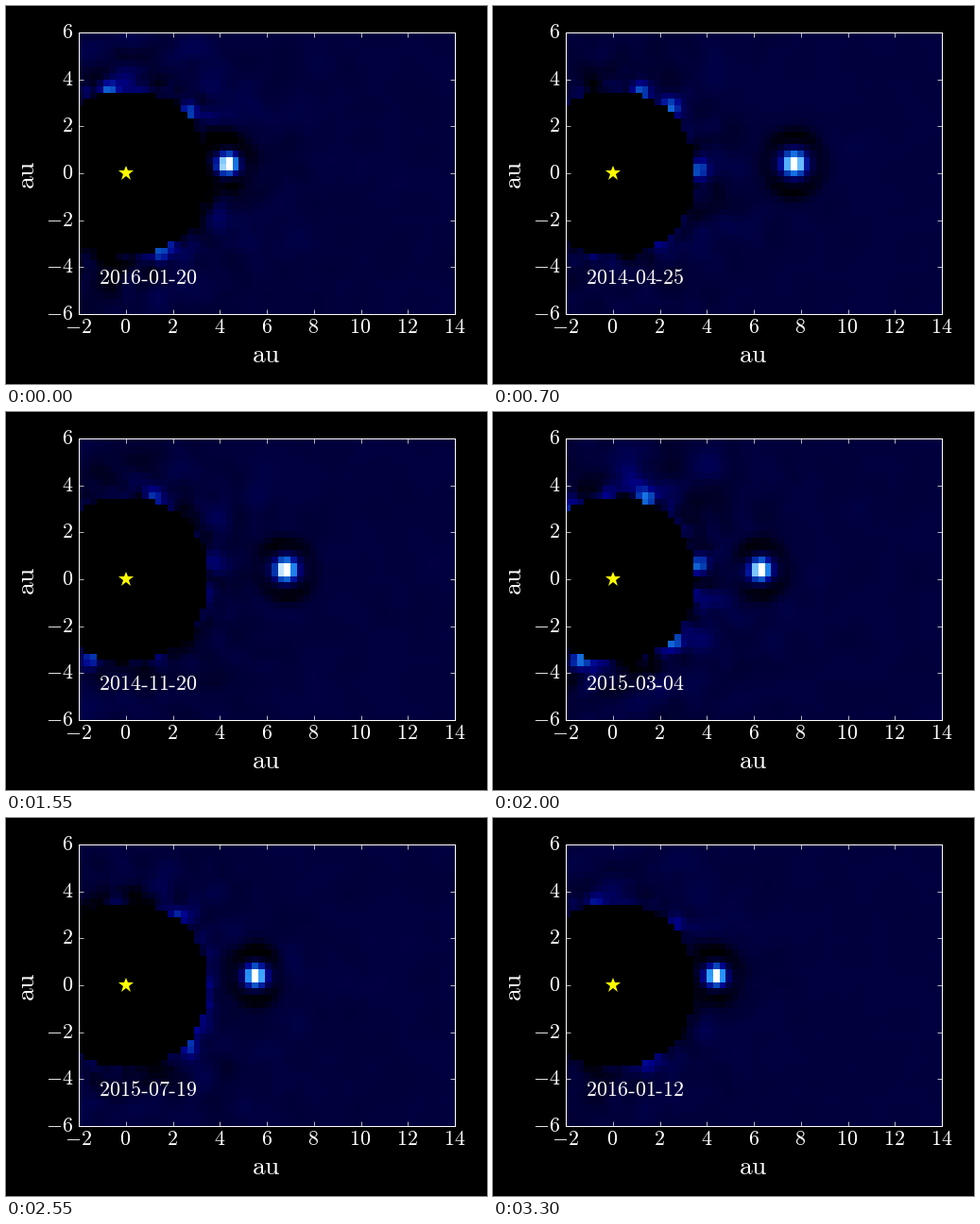
Recreate the animation shown at these times as a matplotlib script. Size 509 px wide and 400 px high, loop 3350 ms.

```python
import numpy as np
import matplotlib.pyplot as plt
from matplotlib.animation import FuncAnimation
from matplotlib.colors import LinearSegmentedColormap

W, H, DPI = 509, 400, 64
LEFT, RIGHT, TOP, BOTTOM = 77, 475, 28, 326
FRAMES, STEP_MS = 67, 50
PT = 72 / DPI          # points per pixel
CELL = 0.2751          # au per detector cell
SKY = 0.125
EDGE = 12.85           # radius of the blocked disc, in cells

plt.rcParams["mathtext.fontset"] = "cm"

cols, rows = np.meshgrid(np.arange(-8, 53), np.arange(-22, 23))
radius = np.hypot(cols, rows)
mask = radius < EDGE
depth = np.clip(radius - EDGE, 0, None)

cmap = LinearSegmentedColormap.from_list("ice", [
    (0.00, "#000000"), (0.28, "#00008c"), (0.42, "#0640b4"),
    (0.56, "#1470e0"), (0.72, "#2c9cff"), (0.86, "#90d0ff"), (1.00, "#ffffff")])


def gauss(d, width):
    return np.exp(-d ** 2 / (2 * width ** 2))


def smooth_noise(rng, width):
    """Unit-variance noise blurred by a Gaussian of the given width."""
    fy = np.fft.fftfreq(cols.shape[0])[:, None]
    fx = np.fft.fftfreq(cols.shape[1])[None, :]
    blur = np.exp(-2 * (np.pi * width) ** 2 * (fx ** 2 + fy ** 2))
    out = np.fft.ifft2(np.fft.fft2(rng.normal(size=cols.shape)) * blur).real
    return (out - out.mean()) / out.std()


def night(seed, strength, *angles):
    """Residual starlight: a noisy halo and bright clumps along the disc edge."""
    rng = np.random.default_rng(seed)
    img = smooth_noise(rng, 1.3) * (.05 * strength * np.exp(-depth / 6) + .003)
    img += .07 * strength * smooth_noise(rng, .7) * np.exp(-depth / 2)
    img -= .015 * np.exp(-depth / 6)
    for a in np.radians(angles):
        d = np.hypot(cols - 13.4 * np.cos(a), rows - 13.4 * np.sin(a))
        img += .42 * strength * gauss(d, 1)
    return img


# Day index -> night; nights in between are blended.
nights = {
    0: night(1, 1.2, 48, 72, 4),
    11: night(2, 1.2, 48, 72, 4),
    32: night(3, .7, 72, 49, -2),
    47: night(4, .7, 71, -113),
    60: night(5, 1.1, 67, -46, 10, -113),
    77: night(6, .7, 52, -45),
    100: night(7, 1.0, 102, 44, -67),
}
nights[99] = .5 * nights[100]
days = np.array(sorted(nights))
stack = np.array([nights[d] for d in days])


def planet(k):
    t = k / 100
    dx = cols - (30.15 - 9 * t - 5.35 * t ** 2)
    dy = rows - 1.5
    r = np.hypot(dx, dy)
    core = 1.12 * gauss(r, 1.15 - .2 * t)
    upright = (dy / np.maximum(r, .1)) ** 2
    ring = gauss(r - 4.6 + t, 1) * (.045 + .06 * upright)
    return core - ring


def view(k):
    i = np.clip(np.searchsorted(days, k), 1, len(days) - 1)
    f = (k - days[i - 1]) / (days[i] - days[i - 1])
    img = SKY + (1 - f) * stack[i - 1] + f * stack[i] + planet(k)
    img[mask] = 0
    return np.clip(img, 0, 1)


fig = plt.figure(figsize=(W / DPI, H / DPI), dpi=DPI, facecolor="black")
ax = fig.add_axes([LEFT / W, 1 - BOTTOM / H, (RIGHT - LEFT) / W,
                   (BOTTOM - TOP) / H], facecolor="black")


def label(x, y, s, size=22, **kw):
    kw = dict(ha="center", va="baseline", color="white") | kw
    return fig.text(x / W, 1 - y / H, s, fontsize=size * PT, **kw)


def roman(s):
    return rf"$\mathrm{{{s}}}$"


half = CELL / 2
image = ax.imshow(view(100), cmap=cmap, vmin=0, vmax=1, origin="lower",
                  interpolation="nearest", aspect="auto",
                  extent=[-8 * CELL - half, 52 * CELL + half,
                          -22 * CELL - half, 22 * CELL + half])
ax.plot(0, 0, "*", color="yellow", ms=17 * PT, mew=0)
ax.set(xlim=(-2, 14), ylim=(-6, 6),
       xticks=range(-2, 15, 2), yticks=range(-6, 7, 2))
ax.tick_params(direction="in", top=True, right=True, length=5 * PT,
               width=.7 * PT, color="white", labelbottom=False, labelleft=False)
for spine in ax.spines.values():
    spine.set(color="white", linewidth=PT)

for v in range(-2, 15, 2):
    label(LEFT - .5 + (v + 2) * (RIGHT - LEFT) / 16, 346.5, f"${v}$")
for v in range(-6, 7, 2):
    label(71, 183 - v * (BOTTOM - TOP) / 12, f"${v}$", ha="right")
label(275.5, 377, roman("au"), 27.5)
label(30, 179, roman("au"), 27.5, rotation=90, rotation_mode="anchor")

# The date: digits share one width, so only the digits change.
date_parts = [label(x, 294.5, "", ha="left") for x in (98.5, 149.8, 179.1)]
for x in (143, 172.4):
    fig.add_artist(plt.Line2D([x / W, (x + 6) / W], [1 - 290 / H] * 2,
                              color="white", lw=1.4 * PT, solid_capstyle="butt"))


def update(i):
    k = int(np.ceil(1.5 * i)) or 100
    image.set_data(view(k))
    date = np.datetime64("2016-01-20") - np.timedelta64(round(8.04 * (100 - k)), "D")
    for part, s in zip(date_parts, str(date).split("-")):
        part.set_text(roman(s))
    return [image, *date_parts]


anim = FuncAnimation(fig, update, frames=FRAMES, interval=STEP_MS,
                     repeat=True, repeat_delay=0, blit=False)
plt.show()
```
